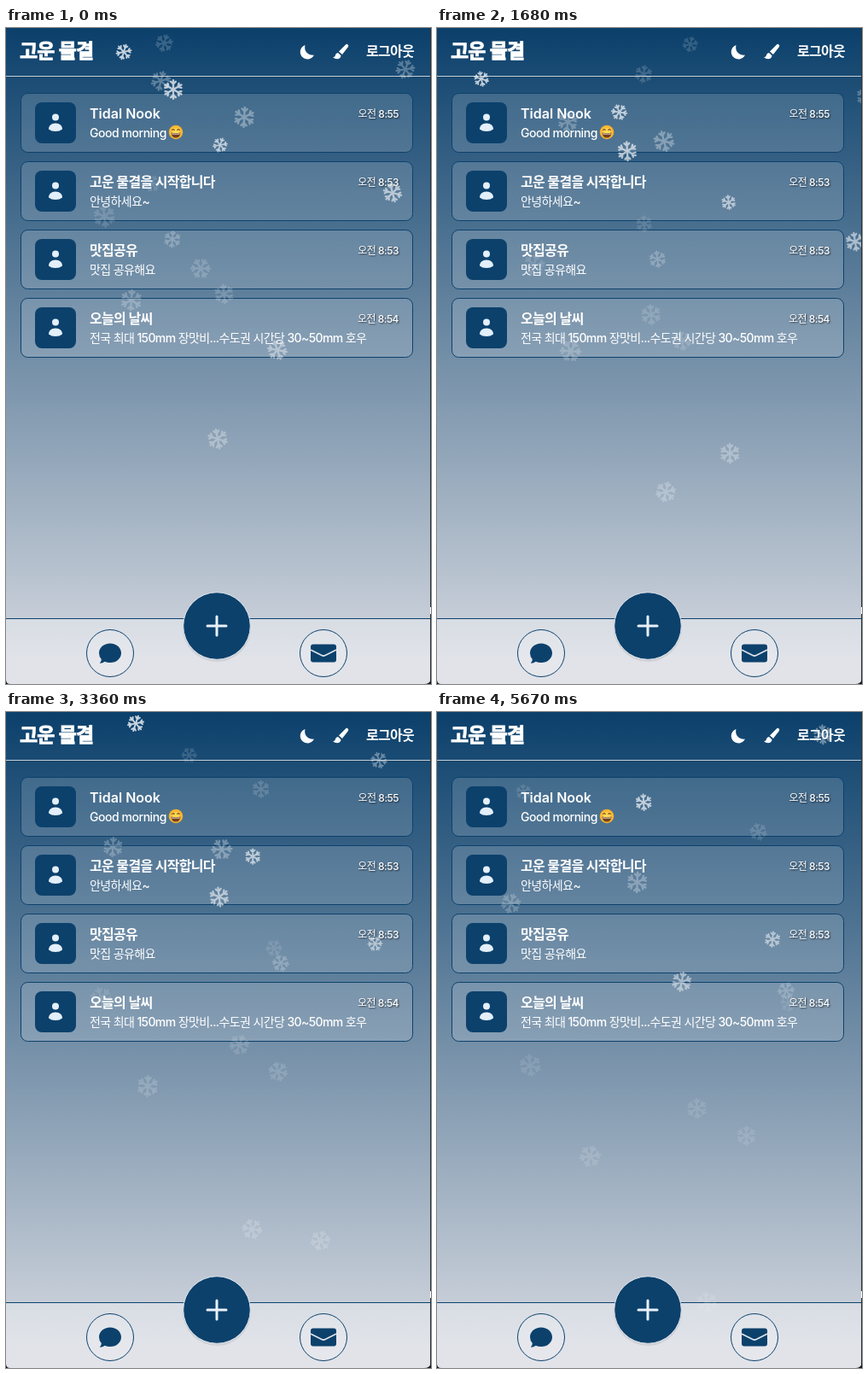
These frames come from a looping animation (498x768 px, 5.74 s). An HTML page:

```html
<!DOCTYPE html>
<html lang="ko">
<meta charset="utf-8">
<style>
  html, body { margin: 0; height: 100%; overflow: hidden; background: #0c416c; }
  svg { display: block; width: 498px; height: 768px; }
  text { font-family: Inter, "Noto Sans CJK KR", "Noto Sans CJK", sans-serif; fill: #fff; }
  .logo { font: 900 23px "Noto Sans CJK KR", "Noto Sans CJK", sans-serif; letter-spacing: -1px; stroke: #fff; stroke-width: .8px; }
  .name { font-size: 16px; font-weight: 600; }
  .note { font-size: 14px; font-weight: 500; letter-spacing: -.45px; }
  .name:lang(ko) { letter-spacing: -.7px; }
  .note:lang(ko) { letter-spacing: -.6px; }
  .time { font-size: 12px; font-weight: 500; letter-spacing: -.5px; text-anchor: end; text-shadow: 1px 1px 2px #000a; }
  .navy { fill: #0c416c; }
  .line { stroke: #0c416c; }
</style>
<body>
<script>
const LOOP = 5740, STEP = 70;

const rooms = [
  ['Tidal Nook', 'Good morning', '8:55', 'en'],
  ['고운 물결을 시작합니다', '안녕하세요~', '8:53', 'ko'],
  ['맛집공유', '맛집 공유해요', '8:53', 'ko'],
  ['오늘의 날씨', '전국 최대 150mm 장맛비...수도권 시간당 30~50mm 호우', '8:54', 'ko'],
];

let seed = 7;
const random = (min, max) => {
  seed = seed * 16807 % 2147483647;
  return min + (max - min) * seed / 2147483647;
};

// Wide drifters look smaller; flakes melt into the pale lower sky.
const makeFlake = (x, y, vx, vy, opacity) => ({
  x, y, vx, vy, opacity,
  size: 27 - Math.abs(vx) / 6,
  angle: random(0, 60),
  spin: random(-40, 40),
});

// Bright flakes: starting point and speed in px/s
const bright = [
  [196, 72, 16, 43],
  [138, 28, 45, 42],
  [136, -11, -50, 42],
  [251, 137, 54, 40],
  [453, 193, 22, 34],
  [318, 377, 15, 72],
  [248, 481, 12, 37],
  [21, -121, 39, 40],
].map(path => makeFlake(...path, .85));

const faint = Array.from({ length: 14 }, () =>
  makeFlake(random(0, 498), random(-150, 350), random(-50, 50), random(10, 45), random(.15, .45)));

const flakes = [...faint, ...bright];

const card = ([name, note, time, lang], i) => `
  <g transform="translate(0 ${i * 80})">
    <rect x="17.5" y="76.5" width="459" height="69" rx="8" fill="#fff" fill-opacity=".15" class="line"/>
    <rect x="34" y="87" width="48" height="48" rx="8" class="navy"/>
    <g fill="#e3effa">
      <circle cx="58" cy="104.500" r="4"/>
      <path d="M50 118.500c0-4 3-7 8-7s8 3 8 7q-3 2.500-8 2.500t-8-2.500z"/>
    </g>
    <text x="98" y="106" class="name" lang="${lang}">${name}</text>
    <text x="98" y="128" class="note" lang="${lang}">${note}</text>
    <text x="460" y="105" class="time">오전 ${time}</text>
  </g>`;

const arms = [0, 60, 120, 180, 240, 300].map(a =>
  `<path d="M0 0V-9M-2.400-7.600L0-5.200L2.400-7.600" transform="rotate(${a})"/>`).join('');

document.body.innerHTML = `
<svg viewBox="0 0 498 768">
  <defs>
    <linearGradient id="sky" x2="0" y2="740" gradientUnits="userSpaceOnUse">
      <stop stop-color="#0b406b"/><stop offset="1" stop-color="#d3d7df"/>
    </linearGradient>
    <radialGradient id="face"><stop offset=".3" stop-color="#ffdc55"/><stop offset="1" stop-color="#f3a928"/></radialGradient>
    <g id="flake" fill="none" stroke="#edf1f5" stroke-width="1.900" stroke-linecap="round">${arms}</g>
  </defs>
  <rect width="498" height="768" fill="url(#sky)"/>

  <text x="16" y="35" class="logo">고운 물결</text>
  <path d="M350.500 20A8.500 8.500 0 1 0 361 31.500A9 9 0 0 1 350.500 20z" fill="#fff"/>
  <path d="M400 19q2 1 1 3l-7 9l-4-3.500l8-8q1-1 2-.5zM389 29l3.500 3.300q-.5 4-4.500 4q-3 0-5-2q3-.5 3-3q1-2 3-2.300z" fill="#fff"/>
  <text x="422" y="33" class="name">로그아웃</text>
  <path d="M0 56.500H497" stroke="#fff" stroke-opacity=".75"/>
  <path d="M0 57.500H497" stroke="#000" stroke-opacity=".15"/>

  ${rooms.map(card).join('')}
  <circle cx="199" cy="122" r="8.300" fill="url(#face)"/>
  <path d="M193.500 122.500q5.500 1.500 11 0q-.5 6-5.500 6t-5.500-6z" fill="#74401c"/>
  <path d="M194.500 123.200q4.500 1 9 0v1.300h-9z" fill="#fff"/>
  <path d="M194.500 120q1.500-3 3 0M200.500 120q1.500-3 3 0" fill="none" stroke="#74401c" stroke-width="1.200"/>

  <rect y="692" width="498" height="76" fill="#fff" fill-opacity=".3"/>
  <path d="M0 691.500H497" class="line"/>
  <g fill="#fff" fill-opacity=".15" class="line">
    <circle cx="122" cy="732" r="27.500"/><circle cx="372" cy="732" r="27.500"/>
  </g>
  <path d="M122 720.500c7.500 0 13 5 13 11.300s-5.500 11.300-13 11.300q-3.500 0-6.200-1.300q-2.500 2-6 2q2.200-2.300 2-4.800q-2.800-3-2.800-7.200c0-6.300 5.500-11.300 13-11.300z" class="navy"/>
  <rect x="357" y="721.500" width="30" height="21" rx="3" class="navy"/>
  <path d="M357 728l13 6.500q2 1 4 0l13-6.500" fill="none" stroke="#dde1e7" stroke-width="1.800"/>
  <circle cx="247" cy="702" r="40" fill="#000" fill-opacity=".08"/>
  <circle cx="247" cy="700" r="39.300" class="navy" stroke="#dfe5ec"/>
  <path d="M236 700h22M247 689v22" stroke="#e8f0f8" stroke-width="3" stroke-linecap="round"/>

  <g id="snow">${flakes.map(() => '<use href="#flake"/>').join('')}</g>
  <path d="M497.500 0V768" stroke="#26323d"/>
  <path d="M497.500 678v8" stroke="#fff"/>
  <path d="M0 763v5h5q-5 0-5-5zM498 760v8h-8q8 0 8-8z" fill="#16191d"/>
</svg>`;

const snow = [...document.getElementById('snow').children];

function draw(now) {
  const t = Math.floor(now % LOOP / STEP) * STEP / 1000;
  flakes.forEach((f, i) => {
    const x = f.x + f.vx * t, y = f.y + f.vy * t;
    snow[i].setAttribute('transform',
      `translate(${x} ${y}) rotate(${f.angle + f.spin * t}) scale(${f.size / 20})`);
    snow[i].setAttribute('opacity', f.opacity * Math.min(1, Math.max(0, 1 - y / 850)));
  });
  requestAnimationFrame(draw);
}
draw(performance.now());
</script>
</body>
</html>
```
